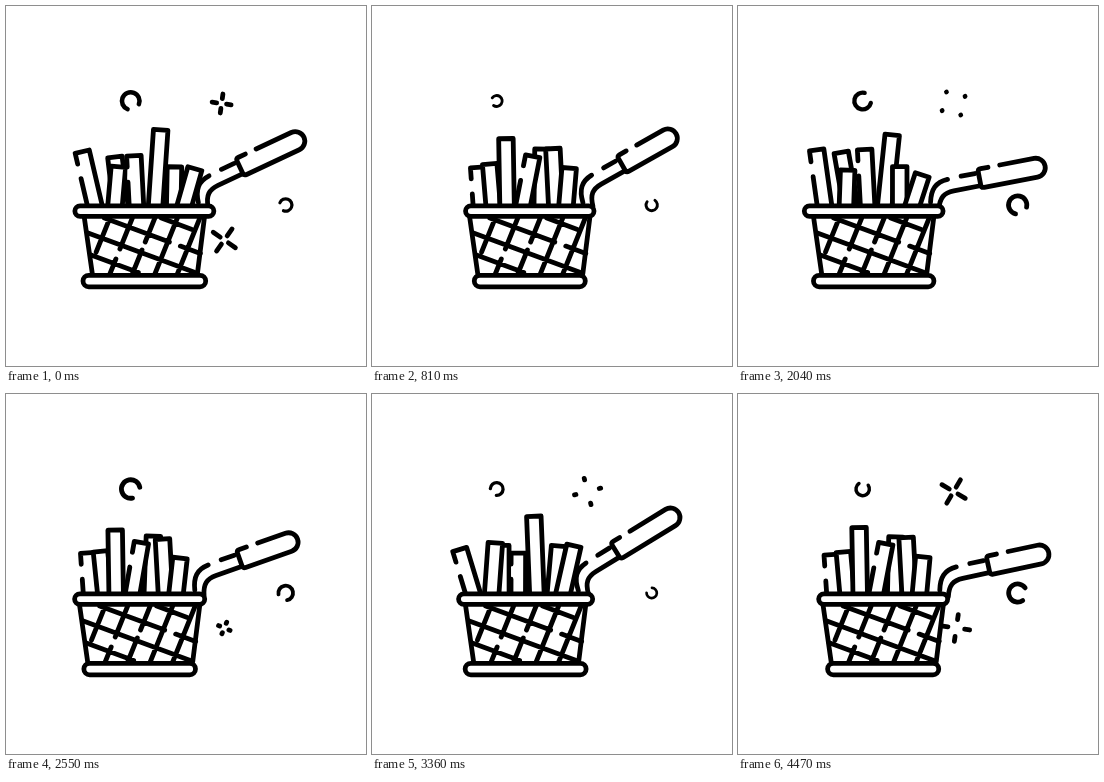
Recreate the animation shown at these times as an HTML page. Size 360x360 px, loop 4.5 s.

```html
<!DOCTYPE html>
<html lang="en">
<head>
<meta charset="utf-8">
<title>Fries basket</title>
<style>
html, body { margin: 0; width: 100%; height: 100%; overflow: hidden; background: #fff; }
svg { display: block; width: 100vw; height: 100vh; }
svg * { stroke-linecap: round; stroke-linejoin: round; }
</style>
</head>
<body>
<svg id="stage" viewBox="0 0 360 360" fill="none" stroke="#000" stroke-width="4.8"></svg>
<script>
const NS = 'http://www.w3.org/2000/svg';
const LOOP = 4500, SWAY = 2800, BOB = 1850, BURST = 1400;
const stage = document.getElementById('stage');

function set(el, attrs) {
  for (const k in attrs) el.setAttribute(k, attrs[k]);
  return el;
}
function add(parent, tag, attrs) {
  return parent.appendChild(set(document.createElementNS(NS, tag), attrs || {}));
}
const wave = (t, period, peak, mid, amp) =>
  mid + amp * Math.cos(2 * Math.PI * (t - peak) / period);
const clamp01 = v => Math.max(0, Math.min(1, v));
const mix = (a, b, u) => a + (b - a) * clamp01(u);

// Smooth periodic curve through values at uneven phases
const KEYS = [0.005, 0.105, 0.428, 0.622, 0.827];
function cycle(vals, p) {
  const n = KEYS.length;
  const at = i => KEYS[((i % n) + n) % n] + Math.floor(i / n);
  const val = i => vals[((i % n) + n) % n];
  const slope = i => (val(i + 1) - val(i - 1)) / (at(i + 1) - at(i - 1));
  let i = -1;
  while (at(i + 1) <= p) i++;
  const h = at(i + 1) - at(i), u = (p - at(i)) / h, u2 = u * u, u3 = u2 * u;
  return (2 * u3 - 3 * u2 + 1) * val(i) + (u3 - 2 * u2 + u) * h * slope(i)
    + (3 * u2 - 2 * u3) * val(i + 1) + (u3 - u2) * h * slope(i + 1);
}

// Top centre (x from the basket axis, y) and lean in degrees
const FRIES = [
  { x: [-62, -57, -52, -60, -66], y: [145.5, 144, 161, 164, 155], a: [-13, -8, -4, -10, -17], gap: true },
  { x: [-29.5, -32.5, -40, -39, -30], y: [151, 146.5, 158, 148, 149], a: [-7, -10, -5, -1, 4] },
  { x: [-26, -26, -24, -20, -24], y: [161, 164, 133, 141, 152], a: [5, 2, -1, 2, 0] },
  { x: [16.5, 18.5, 12.5, 5, 8.5], y: [124, 129, 143, 134, 122], a: [4, 6, 1, -6, -2] },
  { x: [30, 26, 23, 30, 33], y: [161, 160.5, 143, 141.5, 152.5], a: [1, 0, -3, 4, 5] },
  { x: [50.5, 48.5, 39.5, 42, 48.5], y: [163, 169, 162.5, 152, 152], a: [16, 18, 5, 7, 13] },
  { x: [-10.5, -9, 2.8, -1.5, -7.5], y: [149.5, 143.5, 150, 157.5, 159], a: [-3, -3, 11, 4, 0], gap: true }
];
const FRY_W = 14.5;

const basket = add(stage, 'g');
const handle = add(basket, 'g');
add(handle, 'path', { d: 'M11 -3C14 -14 19 -18 29 -18H56' });
add(handle, 'path', { d: 'M4 -11C7 -24 13 -30 25 -30.5M39 -31H53' });
const grip = add(handle, 'path');

const fryBox = add(basket, 'g');
const fries = FRIES.map(() => add(fryBox, 'path', { fill: '#fff' }));

// Wire mesh
const down = (x, off) => 212 + 0.37 * (x + 40) + off;
const falling = (x1, x2, off) => `M${x1} ${down(x1, off)}L${x2} ${down(x2, off)}`;
function rising(k, y1, y2) {
  const px = y => -12 + 22.5 * k - 22.5 * (y - 212) / 56;
  return `M${px(y1)} ${y1}L${px(y2)} ${y2}`;
}
add(basket, 'path', {
  d: [
    falling(17, 47, -21), falling(-40, 25, 0), falling(36, 56, 0),
    falling(-57, 50, 21), falling(-54, -6, 42),
    rising(-1, 212, 246), rising(0, 212, 243), rising(0, 253, 268),
    rising(1, 212, 236), rising(1, 244, 268), rising(2, 212, 268), rising(3, 212, 268)
  ].join('')
});
add(basket, 'path', { d: 'M-60 212L-52 268M60 212L53 268' });
const rim = add(basket, 'rect', { y: 199.8, height: 10.5, rx: 5.25, fill: '#fff' });
const base = add(basket, 'rect', { y: 269.3, height: 11.5, rx: 5.75, fill: '#fff' });

const RING = 'M6.5 -6.5A9.2 9.2 0 1 0 6.5 6.5';
const rings = [
  { x: 124.7, y: 95, turn: 66, peak: 2480, mid: 8.6, amp: 2.5 },
  { x: 279.7, y: 199, turn: 156, peak: 1880, mid: 8.6, amp: 2.5 }
].map(r => ({ ...r, el: add(stage, 'path', { d: RING }) }));

const sparks = [
  { x: 215.6, y: 97.5, lead: 150, even: [8, -40], odd: [10, 75] },
  { x: 218.3, y: 234, lead: 290, even: [35, 50], odd: [-16, 90] }
].map(s => ({ ...s, el: add(stage, 'path') }));

function drawFries(t) {
  const p = (t / BOB) % 1;
  FRIES.forEach((f, i) => {
    const y = cycle(f.y, p), lean = cycle(f.a, p), h = 206 - y, w = FRY_W / 2;
    set(fries[i], {
      d: `M${w} ${h}V0H${-w}V${h}`,
      transform: `translate(${cycle(f.x, p)} ${y}) rotate(${lean})`
    });
    if (f.gap) set(fries[i], { 'stroke-dasharray': `${h + FRY_W + 11} 15 200` });
  });
  // The second and third fries trade depth as they cross
  const [front, back] = p > 0.65 && p < 0.95 ? [fries[1], fries[2]] : [fries[2], fries[1]];
  if (back.nextSibling !== front) fryBox.insertBefore(back, front);
}

function drawBasket(t) {
  const rimW = wave(t, BOB, 80, 133.2, 6), baseW = wave(t, BOB, -90, 117, 6);
  set(basket, { transform: `translate(${wave(t, SWAY, 960, 145.5, 13)} 0)` });
  set(rim, { x: -rimW / 2, width: rimW });
  set(base, { x: -baseW / 2, width: baseW });
  const end = 47 + wave(t, BOB, -300, 67.5, 6.3);
  set(handle, { transform: `translate(55 208) rotate(${wave(t, SWAY, 520, -21, -10.5)})` });
  set(grip, {
    d: `M67 -34.7H59.6Q56.6 -34.7 56.6 -31.7V-18.7Q56.6 -15.7 59.6 -15.7H${end}A9.5 9.5 0 0 0 ${end} -34.7H79`
  });
}

function drawRing(r, t) {
  const s = wave(t, SWAY, r.peak, r.mid, r.amp) / 11;
  const turn = r.turn + 360 * t / SWAY;
  set(r.el, { transform: `translate(${r.x} ${r.y}) rotate(${turn}) scale(${s})` });
}

function drawSpark(s, t) {
  const k = Math.floor((t + s.lead) / BURST);
  const q = (t + s.lead) / BURST - k;
  const [start, rate] = k % 2 ? s.odd : s.even;
  const turn = start + rate * (t - k * BURST) / 1000;
  const outer = mix(5, 13.5, q / 0.2);
  const inner = mix(5, 13.5, (q - 0.3) / 0.25);
  set(s.el, {
    visibility: q < 0.58 ? 'visible' : 'hidden',
    d: `M0 ${-inner}V${-outer}M${inner} 0H${outer + 0.01}M0 ${inner}V${outer}M${-inner} 0H${-outer}`,
    transform: `translate(${s.x} ${s.y}) rotate(${turn})`
  });
}

function draw(t) {
  drawBasket(t);
  drawFries(t);
  rings.forEach(r => drawRing(r, t));
  sparks.forEach(s => drawSpark(s, t));
}

const begin = performance.now();
function tick() {
  draw((performance.now() - begin) % LOOP);
  requestAnimationFrame(tick);
}
tick();
</script>
</body>
</html>
```
